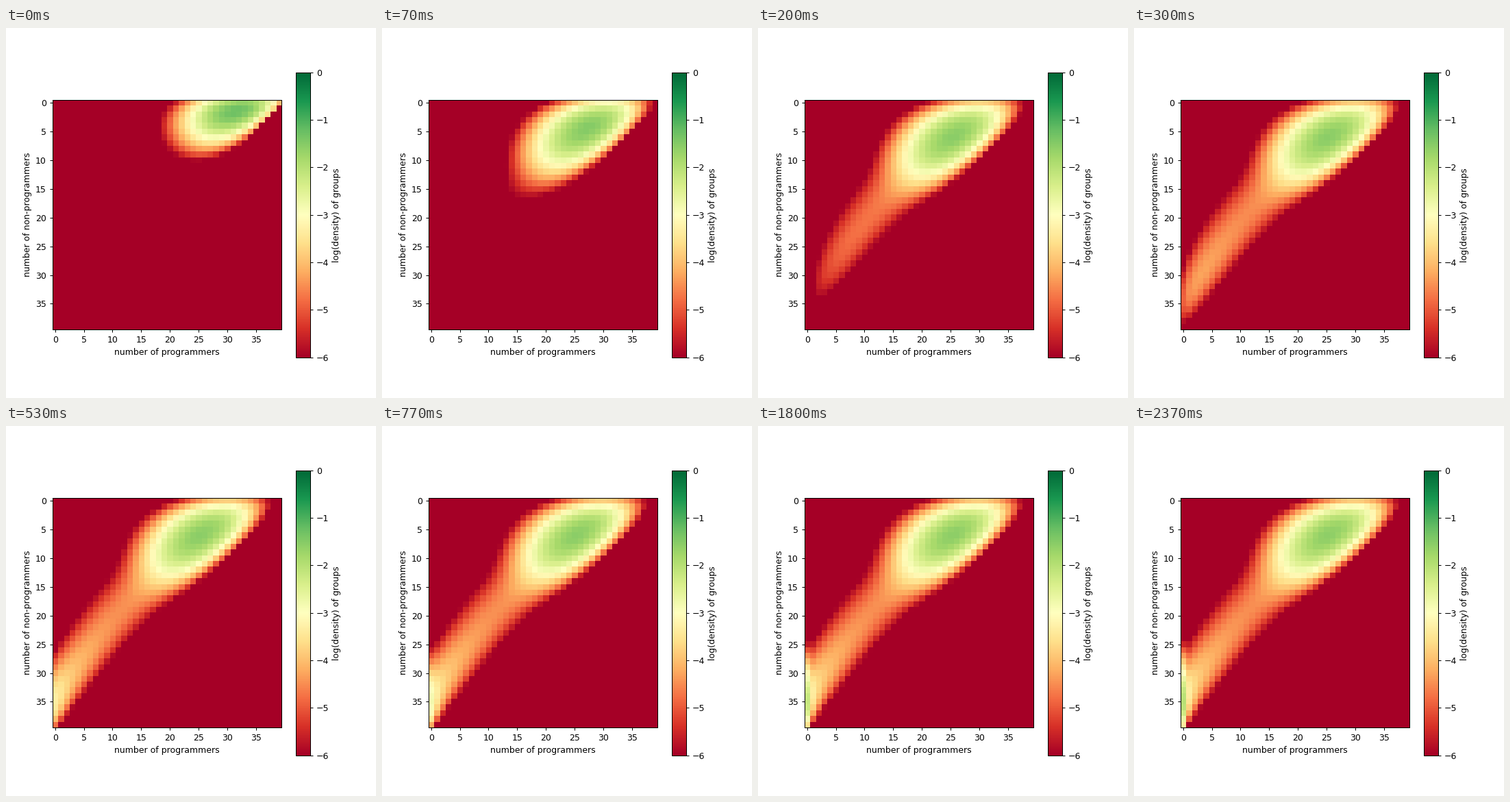
Animation of 540x540 px, one loop 3.3 s. Source, as a matplotlib script:

```python
import numpy as np
import matplotlib.pyplot as plt
from matplotlib.animation import FuncAnimation

SEATS = 39          # places in one group
STEPS = 100         # Euler steps per unit of time
FRAMES = 100
# After the fast phase the picture only refreshes at these frames.
REFRESH = [*range(17), 18, 20, 23, 28, 34, 42, 54, 71]

# Rows: non-programmers, columns: programmers
non, prog = np.mgrid[0:SEATS + 1, 0:SEATS + 1]
empty = np.clip(SEATS - non - prog, 0, None)
share = prog / np.maximum(non + prog, 1)

# Programmers only join groups where they are not a small minority;
# non-programmers leave sooner the more programmers there are.
appeal = 1 / (1 + np.exp(-(share - 0.48) / 0.04))
join_prog = 1.13 * appeal * empty
join_non = (1.68 - 1.13 * appeal) * empty
leave_prog = 0.36 * prog
leave_non = np.minimum(0.70, 0.22 + 0.8 * share) * non
total_rate = join_prog + join_non + leave_prog + leave_non


def advance(dens, steps):
    """Integrate the master equation of the group sizes."""
    dt = 1 / STEPS
    for _ in range(steps):
        change = -total_rate * dens
        change[:, 1:] += (join_prog * dens)[:, :-1]
        change[1:] += (join_non * dens)[:-1]
        change[:, :-1] += (leave_prog * dens)[:, 1:]
        change[:-1] += (leave_non * dens)[1:]
        dens = dens + dt * change
    return dens


def simulate():
    dens = np.zeros((SEATS + 1, SEATS + 1))
    dens[0, SEATS] = 1
    dens = advance(dens, int(1.08 * STEPS))
    pictures = []
    for i in range(FRAMES):
        if i in REFRESH:
            shown = np.log10(np.maximum(dens, 1e-9))
        pictures.append(shown)
        if i < REFRESH[-1]:
            dens = advance(dens, STEPS)
    return pictures


pictures = simulate()

fig, ax = plt.subplots(figsize=(6, 6), dpi=90)
image = ax.imshow(pictures[0], cmap="RdYlGn", vmin=-6, vmax=0)
ax.set_xlabel("number of programmers")
ax.set_ylabel("number of non-programmers")
fig.colorbar(image, ax=ax, label="log(density) of groups")


def draw(i):
    image.set_data(pictures[i])
    return [image]


anim = FuncAnimation(fig, draw, frames=FRAMES, interval=33, repeat=True,
                     repeat_delay=0)
plt.show()
```
